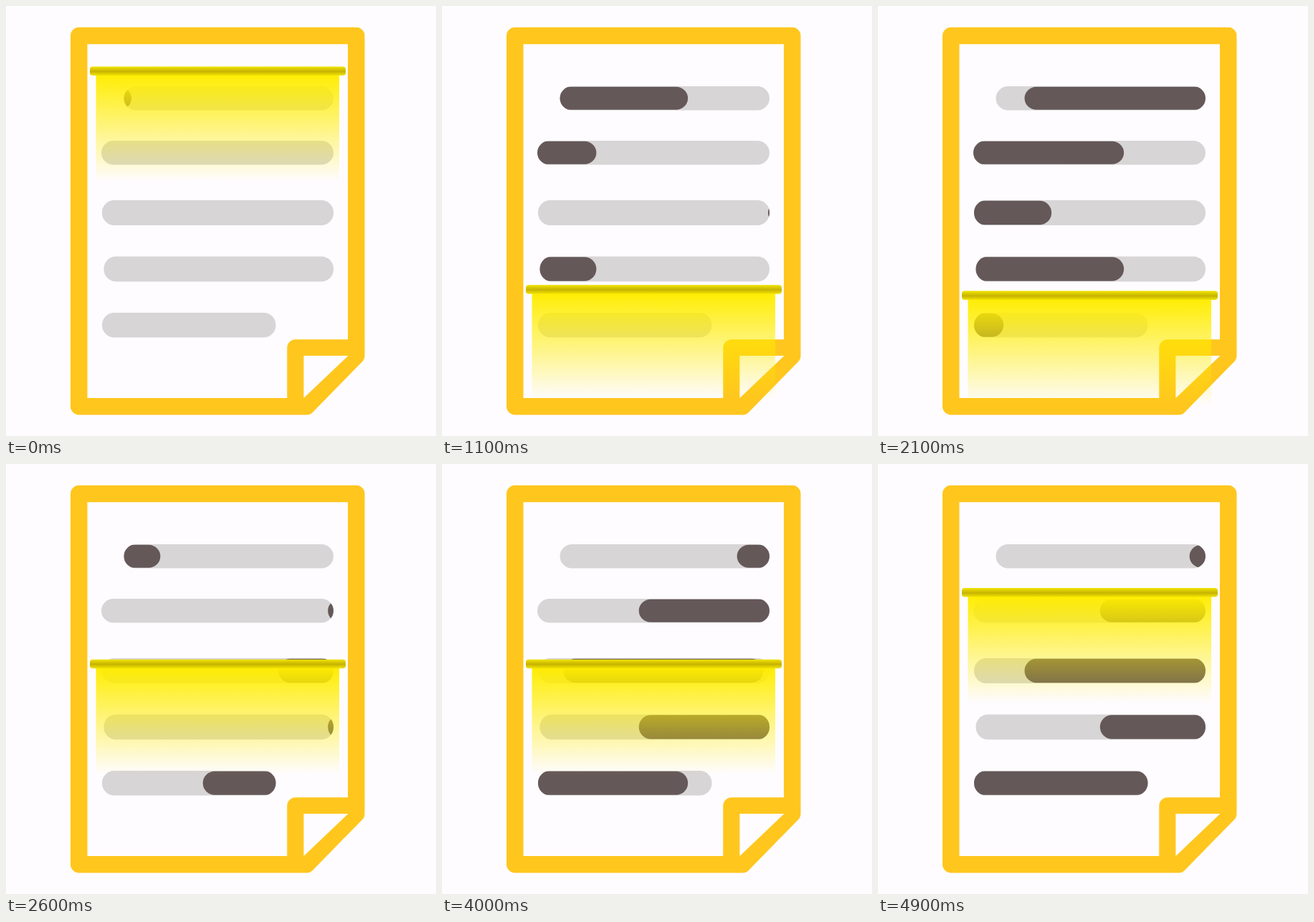
An HTML page for the animation above (5000 ms loop, 600 by 600 pixels).

```html
<!DOCTYPE html>
<html lang="en">
<head>
<meta charset="utf-8">
<title>Document scan</title>
<style>
  html, body { margin: 0; width: 100%; height: 100%; overflow: hidden; background: #fefcff; }
  svg { display: block; width: 100vw; height: 100vh; }
  .page { fill: none; stroke: #ffc61e; stroke-width: 23.5; stroke-linejoin: round; }
</style>
</head>
<body>
<svg viewBox="0 0 600 600">
  <defs>
    <linearGradient id="glow" x1="0" y1="0" x2="0" y2="1">
      <stop offset=".02" stop-color="#ffed00"/>
      <stop offset="1" stop-color="#ffed00" stop-opacity="0"/>
    </linearGradient>
    <linearGradient id="rod" x1="0" y1="0" x2="0" y2="1">
      <stop offset="0" stop-color="#f2e400"/>
      <stop offset=".55" stop-color="#c6b300"/>
      <stop offset="1" stop-color="#f2e400"/>
    </linearGradient>
  </defs>
  <path class="page" d="M101.75 41.5H488.75V488L419.5 558.75H101.75ZM404 558.75V477H488.75"/>
  <path fill="#fefcff" d="M415.5 488H477.5L415.5 547Z"/>
  <g id="lines"></g>
  <g id="scanner">
    <rect x="125.5" width="339.5" height="154" fill="url(#glow)"/>
    <rect x="117" y="-6.5" width="357" height="12.5" rx="4" fill="url(#rod)"/>
  </g>
</svg>
<script>
const NS = 'http://www.w3.org/2000/svg';
const LOOP = 5000, TICK = 100;
const CYCLE = 20;            // steps in one pass of the scanner
const STEPS_PER_TICK = 2.4;
const PILL = 279;

const LINES = [
  { x: 164.5, y: 112, width: 292.5, height: 33.5, delay: 0 },
  { x: 133, y: 188, width: 324, height: 33.5, delay: 4 },
  { x: 134, y: 271, width: 323, height: 35, delay: 7 },
  { x: 136.5, y: 349.5, width: 320.5, height: 35, delay: 4 },
  { x: 134, y: 428, width: 242.5, height: 34.5, delay: 10 }
];

const over = v => Math.max(0, v) ** 2;

// left edge of a dark pill: steady run with a soft start and a soft stop
const sweep = n => 35.1 * n - 146.5 + 2.2 * over(4.4 - n) - 4.3 * over(n - 15.1);

// scanner height, n steps away from its highest point: quick fall, long rest
const drop = n => 412 - 339.5 / (1 + 0.0576 * n ** 3);

function add(parent, tag, attrs) {
  const el = document.createElementNS(NS, tag);
  for (const key in attrs) el.setAttribute(key, attrs[key]);
  return parent.appendChild(el);
}

const root = document.getElementById('lines');
const defs = document.querySelector('defs');
const scanner = document.getElementById('scanner');

const pills = LINES.map(({ delay, ...box }, i) => {
  const shape = { ...box, rx: 17 };
  add(add(defs, 'clipPath', { id: 'clip' + i }), 'rect', shape);
  add(root, 'rect', { ...shape, fill: '#d7d5d6' });
  const group = add(root, 'g', { 'clip-path': `url(#clip${i})` });
  const el = add(group, 'rect', {
    y: box.y + 0.8, width: PILL, height: box.height - 1.6, rx: 16.5, fill: '#655859'
  });
  return { el, delay };
});

function draw(time) {
  const tick = Math.floor(time % LOOP / TICK);
  const step = Math.floor(tick * STEPS_PER_TICK + 1e-6);
  const turn = (step + 1) % CYCLE;
  scanner.setAttribute('transform', `translate(0 ${drop(Math.min(turn, CYCLE - turn))})`);
  for (const { el, delay } of pills) {
    const n = step - delay;
    el.setAttribute('visibility', n < 0 ? 'hidden' : 'visible');
    el.setAttribute('x', sweep(Math.max(0, n) % CYCLE));
  }
}

const start = performance.now();
function frame() {
  draw(performance.now() - start);
  requestAnimationFrame(frame);
}
draw(0);
requestAnimationFrame(frame);
</script>
</body>
</html>
```
